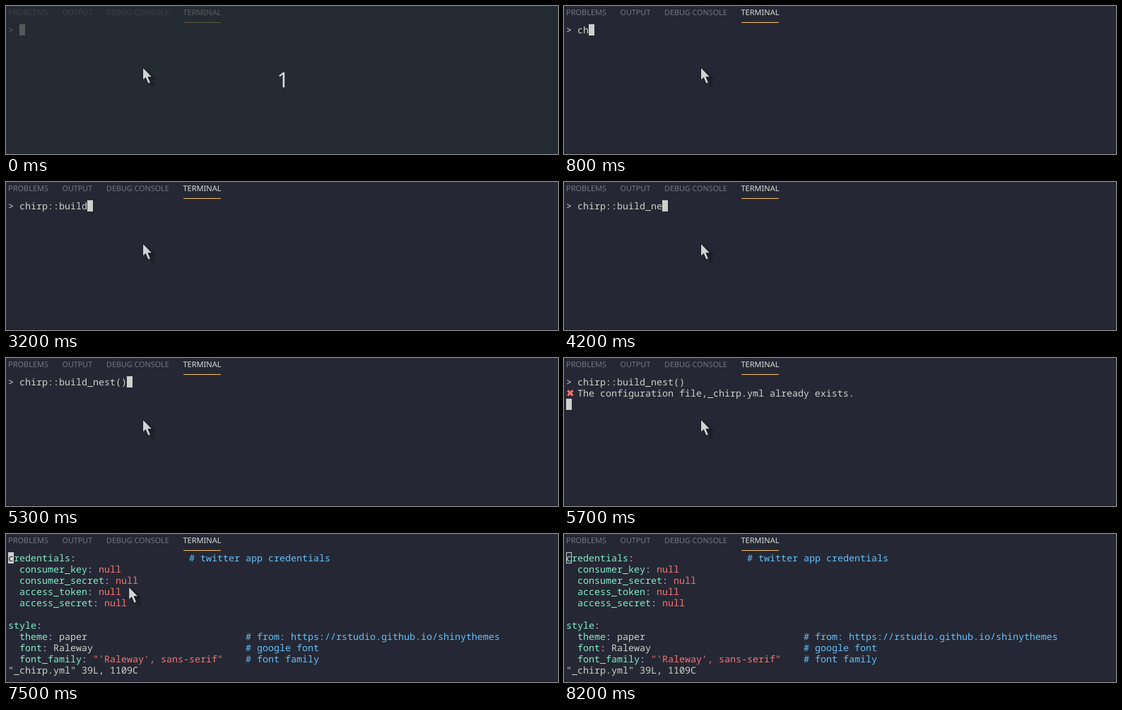
An HTML page that plays this animation: 781 by 211 pixels, repeating every 8.3 s.

```html
<!DOCTYPE html>
<html lang="en">
<head>
<meta charset="utf-8">
<title>Terminal session</title>
<style>
  html, body { margin: 0; width: 100%; height: 100%; overflow: hidden; background: #252834; }
  svg { display: block; width: 781px; height: 211px; }
  text { white-space: pre; text-rendering: geometricPrecision; }
  .tab { font: 11px "Noto Sans", "Open Sans", sans-serif; fill: #757883; }
  .tab.on { fill: #dbdcd8; }
  #term { font: 500 13.3333px "Noto Sans Mono", "DejaVu Sans Mono", monospace; }
  .cross { font: 14px "DejaVu Sans", sans-serif; }
  #count { font: 30px "Noto Sans", "Open Sans", sans-serif; fill: #d8dadb; text-anchor: middle; }
</style>
</head>
<body>
<svg viewBox="0 0 781 211">
  <defs>
    <filter id="blur" x="-50%" y="-50%" width="200%" height="200%"><feGaussianBlur stdDeviation="1.2"/></filter>
  </defs>
  <rect width="781" height="211" fill="#252834"/>
  <text class="tab" x="3" y="13">PROBLEMS</text>
  <text class="tab" x="79.5" y="13" style="font-size:10.8px">OUTPUT</text>
  <text class="tab" x="142" y="13" style="font-size:10.8px">DEBUG CONSOLE</text>
  <text class="tab on" x="250.5" y="13">TERMINAL</text>
  <rect x="251" y="23" width="53" height="1" fill="#fcc259"/>
  <g id="term"></g>
  <rect y="210" width="781" height="1" fill="#191c25"/>
  <g id="dim">
    <rect width="781" height="211" fill="#262d33" opacity=".72"/>
    <text id="count" x="392" y="116">1</text>
  </g>
  <g id="mouse">
    <path d="M0 0V18L4 14.5L7.5 23L11 21.5L7.5 13.5H13Z" transform="translate(6 4)" fill="#11131a" opacity=".55" filter="url(#blur)"/>
    <path d="M0 0V18.5L4 14.8L7.5 23.3L11 21.8L7.6 13.7H13.2Z" fill="#d2d3d3" stroke="#14161d"/>
  </g>
</svg>
<script>
const LOOP = 8300, CELL = 8, ROW = 16, LEFT = 3, TOP = 26;
const FG = '#cfd0ca', BG = '#252834', KEY = '#84eac9', PUNCT = '#d4bfff', RED = '#f77370', BLUE = '#64c0fc';
const COMMAND = 'chirp::build_nest()';
// [time, characters typed by then]
const KEYS = [[600, 1], [800, 2], [1100, 3], [1200, 4], [1400, 5], [1800, 6], [2000, 7], [2300, 8], [2500, 9],
  [2700, 10], [3000, 11], [3200, 12], [3600, 13], [4200, 15], [4400, 16], [4700, 17], [5300, 19]];
const ENTER = 5700, OPEN = 6000, LEAVE = 7500, BLUR = 8200;

// [row, indent, key, value, value colour, comment column, comment]
const CONFIG = [
  [0, 0, 'credentials', '', FG, 32, '# twitter app credentials'],
  [1, 2, 'consumer_key', 'null', RED],
  [2, 2, 'consumer_secret', 'null', RED],
  [3, 2, 'access_token', 'null', RED],
  [4, 2, 'access_secret', 'null', RED],
  [6, 0, 'style', '', FG],
  [7, 2, 'theme', 'paper', FG, 42, '# from: https://rstudio.github.io/shinythemes'],
  [8, 2, 'font', 'Raleway', FG, 42, '# google font'],
  [9, 2, 'font_family', '"\'Raleway\', sans-serif"', RED, 42, '# font family']
];

const $ = id => document.getElementById(id);
const term = $('term'), dim = $('dim'), mouse = $('mouse');

const put = (row, col, str, fill = FG, cls = '') =>
  `<text class="${cls}" x="${LEFT + col * CELL}" y="${TOP + 13 + row * ROW}" fill="${fill}">${str.replace(/>/g, '&gt;')}</text>`;
const block = (row, col) =>
  `<rect x="${LEFT + col * CELL}" y="${TOP + row * ROW}" width="${CELL}" height="${ROW}" fill="${FG}"/>`;

function shell(typed, done) {
  const line = put(0, 0, '> ' + COMMAND.slice(0, typed));
  if (!done) return line + block(0, 2 + typed);
  return line + put(1, 0, '✖', RED, 'cross') +
    put(1, 2, 'The configuration file,_chirp.yml already exists.') + block(2, 0);
}

function editor(focused) {
  let out = '';
  for (const [row, col, key, value, fill, noteCol, note] of CONFIG) {
    const end = col + key.length;
    out += put(row, col, key, KEY) + put(row, end, ':', PUNCT);
    if (value) out += put(row, end + 2, value, fill);
    if (note) out += put(row, noteCol, note, BLUE);
  }
  out += put(10, 0, '"_chirp.yml" 39L, 1109C');
  return out + (focused
    ? block(0, 0) + put(0, 0, 'c', BG)
    : `<rect x="3.5" y="26.5" width="7" height="15" fill="none" stroke="${FG}"/>`);
}

function screen(t) {
  if (t >= OPEN) return editor(t < BLUR);
  const typed = KEYS.reduce((n, [at, count]) => t >= at ? count : n, 0);
  return shell(typed, t >= ENTER);
}

function moveMouse(t) {
  const step = t < LEAVE ? 0 : Math.min(5, Math.floor((t - LEAVE) / 100) + 1);
  const p = step / 5, e = p * p * (3 - 2 * p);
  mouse.setAttribute('transform', `translate(${193.5 - 190 * e} ${87.5 - 118 * e})`);
  mouse.style.display = step < 5 ? '' : 'none';
}

let last = '';
function draw(t) {
  const html = screen(t);
  if (html !== last) term.innerHTML = last = html;
  dim.style.display = t < 500 ? '' : 'none';
  moveMouse(t);
}

const start = performance.now();
function tick() {
  draw((performance.now() - start) % LOOP);
  requestAnimationFrame(tick);
}
tick();
</script>
</body>
</html>
```
